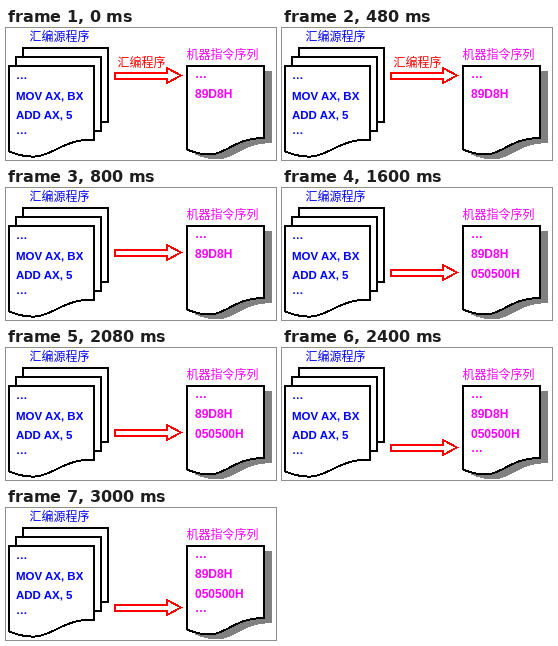
Recreate the animation shown at these times as an HTML page. Size 270x132 px, loop 3400 ms.

```html
<!DOCTYPE html>
<html lang="zh">
<head>
<meta charset="utf-8">
<title>汇编程序</title>
<style>
  html, body { margin: 0; width: 100%; height: 100%; overflow: hidden; background: #fff; }
  svg { display: block; width: 270px; height: 132px; }
  path { shape-rendering: crispEdges; }
  text { font: bold 11.5px "Liberation Sans", Arial, sans-serif; }
  .title { font: 12px "Noto Sans CJK SC", "Noto Sans CJK", sans-serif; }
  .code { fill: #00f; }
  .hex { fill: #f0f; }
  text.hex:not(.title) { font-size: 12px; }
  .page { fill: #fff; stroke: #000; stroke-width: 2; }
  .red { fill: #f00; }
  .arrow { fill: #fff; stroke: #f00; stroke-width: 2; }

  .arrow, .label, .second, .rest { animation: 3.4s step-end infinite; }
  .arrow { animation-name: descend; }
  .label { animation-name: first-step; }
  .second { animation-name: from-third; }
  .rest { animation-name: from-fourth; }

  @keyframes descend {
    0% { transform: translateY(0); }
    23.5294% { transform: translateY(17px); }
    47.0588% { transform: translateY(37px); }
    70.5882%, 100% { transform: translateY(52px); }
  }
  @keyframes first-step {
    0% { opacity: 1; }
    23.5294%, 100% { opacity: 0; }
  }
  @keyframes from-third {
    0% { opacity: 0; }
    47.0588%, 100% { opacity: 1; }
  }
  @keyframes from-fourth {
    0% { opacity: 0; }
    70.5882%, 100% { opacity: 1; }
  }
</style>
</head>
<body>
<svg viewBox="0 0 270 132">
  <defs>
    <path id="sheet" d="M3 38H88V111.5C45.5 111.5 45.5 140 3 123.5Z"/>
    <path id="output" d="M181 37.5H258V110C219.5 110 219.5 137.5 181 121.5Z"/>
  </defs>

  <use href="#sheet" class="page" x="14" y="-18"/>
  <use href="#sheet" class="page" x="7" y="-9"/>
  <use href="#sheet" class="page"/>
  <text class="title code" x="23.5" y="13">汇编源程序</text>
  <g class="code">
    <text x="10" y="51">…</text>
    <text x="10" y="71.5">MOV AX, BX</text>
    <text x="10" y="91">ADD AX, 5</text>
    <text x="10" y="106">…</text>
  </g>

  <use href="#output" x="8" y="5" fill="#808080"/>
  <use href="#output" class="page"/>
  <text class="title hex" x="180.5" y="30.5">机器指令序列</text>
  <text class="hex" x="189" y="50">…</text>
  <text class="hex" x="189" y="69.5">89D8H</text>
  <text class="hex second" x="189" y="89.5">050500H</text>
  <text class="hex rest" x="189" y="104">…</text>

  <text class="title red label" x="111.5" y="39">汇编程序</text>
  <path class="arrow" d="M109 44.5H161V40L175 47.5L161 55V50.5H109Z"/>
</svg>
</body>
</html>
```
